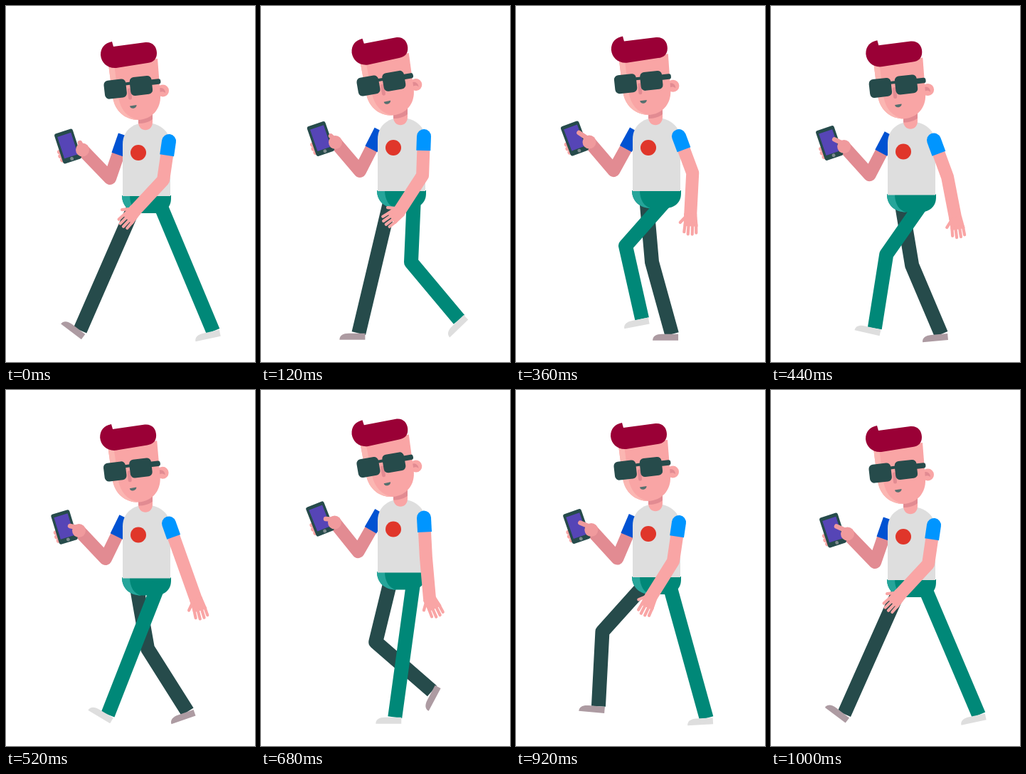
Write an HTML page that moves like this. It is 350x500 px and loops after 1040 ms.

```html
<!DOCTYPE html>
<html lang="en">
<head>
<meta charset="utf-8">
<title>Walking with a phone</title>
<style>
  html, body { margin: 0; width: 100%; height: 100%; overflow: hidden; background: #fff; }
  svg { display: block; width: 350px; height: 500px; }
  .limb { fill: none; stroke-linejoin: round; }
  .skin { fill: #f9a5a5; }
  .shade { fill: #e28b92; }
  .dark { fill: #264b4b; }
  .fingers { fill: none; stroke: #f9a5a5; stroke-linecap: round; stroke-linejoin: round; }
</style>
</head>
<body>
<svg viewBox="0 0 350 500">
  <g id="farArm">
    <path id="farSkin" class="limb" stroke="#e28b92" stroke-width="18"/>
    <path id="farSleeve" class="limb" stroke="#0052d2" stroke-width="19" stroke-linecap="butt"/>
    <g id="phone">
      <path class="fingers" stroke-width="6" d="M-14 4H-8M-14.5 10H-8M-13.5 16H-8"/>
      <rect class="dark" x="-13.5" y="-22" width="27" height="44" rx="3"/>
      <rect x="-10" y="-17" width="20" height="32" fill="#5645b6"/>
      <circle cy="18.3" r="2.4" fill="#7d8b8d"/>
    </g>
    <circle id="palm" r="9.5" fill="#f09a9d"/>
    <path id="thumb" class="limb" stroke="#f09a9d" stroke-width="6.5" stroke-linecap="round"/>
  </g>

  <path id="darkLeg" class="limb" stroke="#264b4b" stroke-width="20"/>
  <path id="darkFoot" fill="#ad9ba2" d="M9 0H-14C-22 0-27 3-27 9H9Z"/>

  <g id="hips">
    <path fill="#008878" d="M163 266H232V270C232 284 222 291 209 291H190C174 291 163 281 163 266Z"/>
    <path fill="#26a59a" d="M163 266H174C174 279 180 289 190 291C174 291 163 281 163 266Z"/>
  </g>
  <path id="lightLeg" class="limb" stroke="#008878" stroke-width="20"/>
  <path id="lightFoot" fill="#dedede" d="M9 0H-14C-22 0-27 3-27 9H9Z"/>

  <g id="torso">
    <path fill="#dedede" d="M164 267V194C164 176 178 164 196 164C217 164 231 177 231 194V267Z"/>
    <path class="skin" d="M186 150H206V163C206 178 186 178 186 163Z"/>
    <path class="shade" d="M186 150H206V159C201 163 194 165 186 165Z"/>
    <circle cx="186" cy="206" r="11" fill="#e0362a"/>
  </g>

  <g id="head">
    <circle class="skin" cx="220.500" cy="119" r="8.500"/>
    <path class="shade" d="M214 116C219 113 224 117 224 122C220 119 217 120 214 123Z"/>
    <path class="skin" d="M144 82L150 128C153 148 168 160 186 160C205 159 218 145 217 125L213 74Z"/>
    <path fill="#fbb6b2" d="M144 82L150 128C153 148 168 160 186 160C171 157 161 146 158 128L152 82Z"/>
    <path fill="#9a0036" d="M149 50L151 57L196 51C206 50 212 57 212 66C212 75 207 79 199 80L155 87C143 88 134 80 133 69C133 58 139 52 149 50Z"/>
    <path class="limb" stroke="#e28b92" stroke-width="5" stroke-linecap="round" d="M173.500 118L174.500 129"/>
    <g class="dark" transform="rotate(-6.500 172 114)">
      <rect x="138" y="101.500" width="31" height="26" rx="6"/>
      <rect x="174.500" y="101" width="31" height="26" rx="6"/>
      <rect x="166" y="107" width="12" height="4"/>
      <rect x="203" y="107" width="15" height="7.500" rx="3"/>
    </g>
    <path fill="#56706f" d="M174 140.500L183.500 139C184 144 175 146 174 140.500Z"/>
  </g>

  <path id="nearSkin" class="limb" stroke="#f9a5a5" stroke-width="18"/>
  <g id="nearHand">
    <path class="skin" d="M-9-3H9L11 15H-9Z"/>
    <path class="fingers" stroke-width="4.200" d="M-6 1L-14 10M-7 12L-8 23M-2 12L-2.500 26M3.500 12L3.500 26M8.500 12L9 24"/>
  </g>
  <path id="nearSleeve" fill="#0095ff" d="M-10 20V0A10 10 0 0 1 10 0V20Z"/>
</svg>
<script>
const LOOP = 1040, STEP = 40;
const THIGH = 92, SHIN = 105, UPPER_ARM = 55, FOREARM = 60;
const STRIDE = [0, 60, 120, 240, 360, 440, 480, 520, 600, 680, 760, 840, 920, 1000];
const SWING = [0, 120, 360, 520, 680, 840, 1000];

// Smooth periodic curve through the keys, flat at every local extreme.
function track(times, values) {
  const n = times.length;
  const time = i => times[(i + n) % n] + Math.floor(i / n) * LOOP;
  const value = i => values[(i + n) % n];
  const slope = i => (value(i + 1) - value(i)) / (time(i + 1) - time(i));
  const tangent = i => {
    const a = slope(i - 1), b = slope(i);
    return a * b <= 0 ? 0 : 2 * a * b / (a + b);
  };
  return t => {
    let i = n - 1;
    while (times[i] > t) i--;
    const span = time(i + 1) - time(i), u = (t - time(i)) / span, v = 1 - u;
    return value(i) * (1 + 2 * u) * v * v + value(i + 1) * (3 - 2 * u) * u * u
      + span * u * v * (tangent(i) * v - tangent(i + 1) * u);
  };
}
const stride = (...values) => track(STRIDE, values);
const swing = (...values) => track(SWING, values);

const bob = stride(0, -3.5, -7, -10.5, -7, -1.5, -0.5, -2.5, -6, -10.5, -11, -9, -4, 0);
const legs = {
  dark: {
    hip: 183,
    thigh: stride(-23.6, -19, -13.4, -3, 5, 9.5, 10.5, 10, 0, -13.7, -31, -46.7, -42, -24),
    shin: stride(-23.6, -19, -13.4, -1, 15.5, 23, 27, 32.3, 43, 49, 42, 25, -3, -24),
    foot: stride(37, 15, 0, 0, 0, -5, -12, -19, -42, -62, -52, -27, 5, 37)
  },
  light: {
    hip: 215,
    thigh: stride(22.7, 13, -2.5, -27, -41.5, -35, -28, -21.4, -14.7, -7.8, 0, 7.6, 15.5, 23),
    shin: stride(22.7, 32, 40, 37, 12.7, -9, -19, -21.4, -14.7, -7.8, 0, 7.6, 15.5, 23),
    foot: stride(-12, -28, -44, -40, -11, 13, 26, 31, 5, 0, 0, 0, -3, -12)
  }
};
const headTilt = swing(0, -3.3, 0.5, -0.5, -3.3, 0, 0);
const near = {
  upper: swing(-8.3, -2, 20.5, 19.6, 3, -8.5, -8.3),
  fore: swing(-43, -33, -3, 19.6, 5, -15, -43),
  hand: swing(-43, -53, -2, 17, 26, 0, -43)
};
const far = {
  upper: swing(-19, -27, -29, -26, -30, -28, -19),
  phoneX: swing(87, 84, 82.5, 82, 83, 83.5, 87),
  phoneY: swing(197, 193.5, 193, 195, 191.5, 193.5, 197),
  phoneTilt: swing(-18, -19, -20.5, -17, -21.5, -20.5, -18),
  thumbX: swing(17, 14, 6, 8, 8, 5, 5),
  thumbY: swing(-5, -4, -8, -1.5, 0, -4, -5.5)
};

const el = id => document.getElementById(id);
const line = (id, ...points) => el(id).setAttribute('d', 'M' + points.map(p => p.join(' ')).join('L'));
const place = (id, [x, y], angle = 0) =>
  el(id).setAttribute('transform', `translate(${x} ${y}) rotate(${angle})`);
// Angles are in degrees from straight down, positive to the right.
function reach([x, y], length, angle) {
  const a = angle * Math.PI / 180;
  return [x + length * Math.sin(a), y + length * Math.cos(a)];
}

function drawLeg(name, t, lift) {
  const leg = legs[name];
  const hip = [leg.hip, 275 + lift];
  const knee = reach(hip, THIGH, leg.thigh(t));
  const ankle = reach(knee, SHIN, leg.shin(t));
  line(name + 'Leg', hip, knee, ankle);
  place(name + 'Foot', ankle, leg.foot(t));
}

function drawNearArm(t, lift) {
  const shoulder = [229, 190 + lift], upper = near.upper(t);
  const elbow = reach(shoulder, UPPER_ARM, upper);
  const wrist = reach(elbow, FOREARM, near.fore(t));
  line('nearSkin', shoulder, elbow, wrist);
  place('nearHand', wrist, -near.hand(t));
  place('nearSleeve', shoulder, -upper);
}

function drawFarArm(t, lift) {
  const shoulder = [164, 190 + lift], upper = far.upper(t);
  const elbow = reach(shoulder, UPPER_ARM, upper);
  const phone = [far.phoneX(t), far.phoneY(t) + lift];
  const palm = [phone[0] + 20.5, phone[1] + 5];
  line('farSkin', shoulder, elbow, palm);
  line('farSleeve', reach(shoulder, -9, upper), reach(shoulder, 20, upper));
  place('phone', phone, far.phoneTilt(t));
  place('palm', palm);
  line('thumb', [palm[0] - 1, palm[1] - 4], [phone[0] + far.thumbX(t), phone[1] + far.thumbY(t)]);
}

function draw(t) {
  const lift = bob(t);
  drawFarArm(t, lift);
  drawLeg('dark', t, lift);
  drawLeg('light', t, lift);
  drawNearArm(t, lift);
  place('hips', [0, lift]);
  place('torso', [0, lift]);
  el('head').setAttribute('transform', `translate(0 ${lift}) rotate(${headTilt(t)} 195 165)`);
}

let start;
function tick(now) {
  start ??= now;
  draw(Math.floor((now - start) % LOOP / STEP) * STEP);
  requestAnimationFrame(tick);
}
draw(0);
requestAnimationFrame(tick);
</script>
</body>
</html>
```
